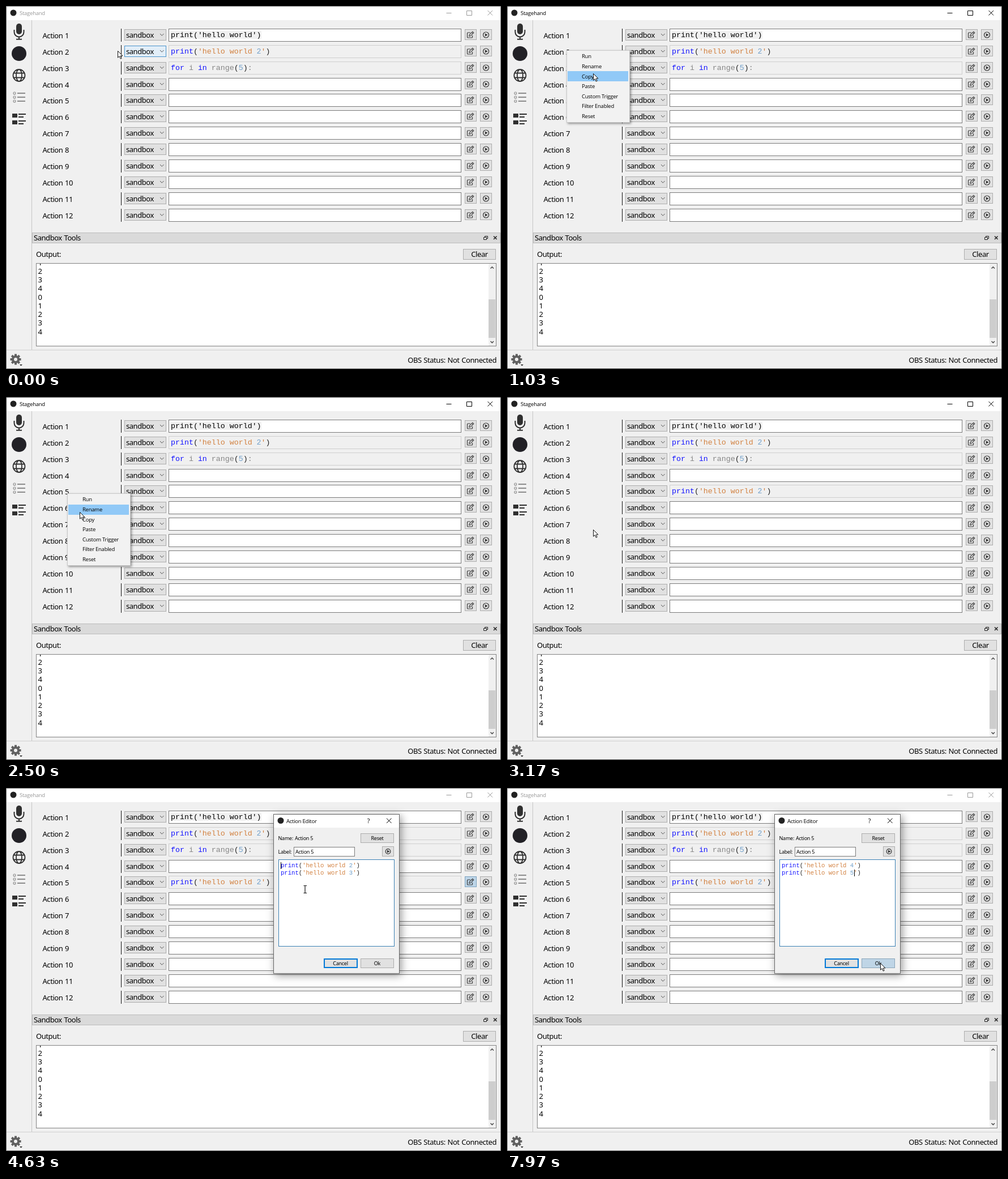
Animation of 874x641 px, one loop 8000 ms. Source, as an HTML page with a canvas:

```html
<!DOCTYPE html>
<html lang="en">
<head>
<meta charset="utf-8">
<title>Action editor demo</title>
<style>
html, body { margin: 0; width: 100%; height: 100%; overflow: hidden; background: #f0f0f0; }
canvas { display: block; }
</style>
</head>
<body>
<canvas id="stage" width="874" height="641"></canvas>
<script>
const ctx = document.getElementById('stage').getContext('2d');
const LOOP = 8000;
// Font, letter spacing, word spacing
const UI = ['13px "Noto Sans", sans-serif', '-0.45px', '0.8px'];
const SMALL = ['9px "Noto Sans", sans-serif', '-0.25px', '0px'];
const TITLE = ['9.5px "Open Sans", sans-serif', '-0.25px', '0px'];
const mono = size => [size + 'px "Liberation Mono", monospace', '0px', '0px'];
const MENU = ['Run', 'Rename', 'Copy', 'Paste', 'Custom Trigger', 'Filter Enabled', 'Reset'];

// Pointer path: time, x, y
const PATH = [
  [0, 197, 79], [30, 197, 79], [450, 105, 78], [570, 105, 78], [830, 140, 104], [870, 141, 105],
  [1030, 152, 119], [1430, 152, 119], [2080, 100, 171], [2130, 100, 171], [2200, 108, 170],
  [2270, 108, 171], [2730, 152, 234], [3370, 152, 234], [4170, 812, 163], [4230, 820, 167],
  [4330, 820, 167], [4630, 528, 179], [4690, 528, 179], [4980, 605, 151], [5030, 605, 151],
  [5230, 613, 142], [5400, 613, 142], [5570, 671, 197], [7570, 671, 197], [7930, 659, 309], [LOOP, 659, 309]
];

const clamp = v => Math.max(0, Math.min(1, v));
const ramp = (t, start, length) => clamp((t - start) / length);
const inside = (p, x, y, w, h) => p.x >= x && p.x < x + w && p.y >= y && p.y < y + h;
const rowY = i => Math.round(50.95 + 28.88 * i);

function pointer(t) {
  const i = PATH.findIndex(k => k[0] > t);
  const [t0, x0, y0] = PATH[i - 1], [t1, x1, y1] = PATH[i];
  const u = ramp(t, t0, t1 - t0), e = u * u * (3 - 2 * u);
  return { x: Math.round(x0 + (x1 - x0) * e), y: Math.round(y0 + (y1 - y0) * e) };
}

function rect(x, y, w, h, color) {
  ctx.fillStyle = color;
  ctx.fillRect(x, y, w, h);
}

function box(x, y, w, h, fill, edge, line = 1) {
  rect(x, y, w, h, edge);
  rect(x + line, y + line, w - 2 * line, h - 2 * line, fill);
}

function text(s, x, y, font, color = '#000', align = 'left') {
  [ctx.font, ctx.letterSpacing, ctx.wordSpacing] = font;
  ctx.textAlign = align;
  ctx.fillStyle = color;
  ctx.fillText(s, x, y);
}

function disc(x, y, r, color) {
  ctx.fillStyle = color;
  ctx.beginPath();
  ctx.arc(x, y, r, 0, 7);
  ctx.fill();
}

function stroke(d, color, width = 1) {
  ctx.strokeStyle = color;
  ctx.lineWidth = width;
  ctx.stroke(new Path2D(d));
}

function fill(d, color) {
  ctx.fillStyle = color;
  ctx.fill(new Path2D(d));
}

function at(x, y, draw) {
  ctx.save();
  ctx.translate(x, y);
  draw();
  ctx.restore();
}

function tokenColor(s) {
  if (/^(print|for|in)$/.test(s)) return '#1414ff';
  if (s[0] === "'") return '#d2803f';
  if (/\d/.test(s)) return '#6f9fca';
  return /[\w:]/.test(s) ? '#858585' : '#222';
}

function code(s, x, y, size) {
  for (const m of s.matchAll(/'[a-z ]*|\w+|\s+|[():]/g))
    text(m[0], x + m.index * size * 0.6, y, mono(size), tokenColor(m[0]));
}

function shadowed(blur, offset, draw) {
  ctx.save();
  ctx.shadowColor = 'rgba(0,0,0,.4)';
  ctx.shadowBlur = blur;
  ctx.shadowOffsetX = ctx.shadowOffsetY = offset;
  draw();
  ctx.restore();
}

function button(x, y, w, h, hot = 0) {
  box(x, y, w, h, '#e1e1e1', '#adadad');
  if (!hot) return;
  ctx.save();
  ctx.globalAlpha *= hot;
  box(x, y, w, h, '#e2eef8', '#4a94cc');
  ctx.restore();
}

function playIcon(x, y, r) {
  at(x, y, () => {
    ctx.beginPath();
    ctx.arc(0, 0, r, 0, 7);
    ctx.strokeStyle = '#333';
    ctx.lineWidth = 1.2;
    ctx.stroke();
    fill('M-1.7 -2.8L3 0L-1.7 2.8Z', '#333');
  });
}

function editIcon(x, y) {
  at(x, y, () => {
    stroke('M0 -4H-4.5Q-5.5 -4 -5.5 -3V4Q-5.5 5 -4.5 5H2.5Q3.5 5 3.5 4V1', '#3a3a3a', 1.2);
    stroke('M-2.3 2.3L-1.8 -.2L3.8 -5.8L5.8 -3.8L.2 1.8ZM2.3 -4.3L4.3 -2.3', '#3a3a3a', 1.1);
  });
}

function sidebar() {
  const dark = '#303030';
  at(23, 46, () => {
    ctx.fillStyle = dark;
    ctx.beginPath();
    ctx.roundRect(-5, -15, 10, 19, 5);
    ctx.fill();
    stroke('M-8.5 -4V0A8.5 8.5 0 0 0 8.5 0V-4M0 8V12M-5 12.7H5', dark, 2);
  });
  disc(23, 84, 13, '#222126');
  at(23, 122.5, () => {
    stroke('M-10.5 0A10.5 10.5 0 1 0 10.5 0A10.5 10.5 0 1 0 -10.5 0' +
      'M-5 0A5 10.5 0 1 0 5 0A5 10.5 0 1 0 -5 0M-10 -4H10M-10 4H10', dark, 1.8);
  });
  for (const dy of [-7, 0, 7]) {
    at(23, 161 + dy, () => {
      stroke('M-10 0A2 2 0 1 0 -6 0A2 2 0 1 0 -10 0', '#8c8c8c', 1.1);
      rect(-3, -1, 14, 2, '#8c8c8c');
    });
  }
  for (const y of [190, 202]) {
    rect(11, y, 9, 7, dark);
    rect(22, y, 13, 2, dark);
    rect(22, y + 5, 9, 2, dark);
  }
  at(17, 624, () => {
    for (let i = 0; i < 8; i++) {
      rect(-2, -9.5, 4, 5, '#606060');
      ctx.rotate(Math.PI / 4);
    }
    disc(0, 0, 7, '#606060');
    disc(0, 0, 3, '#f0f0f0');
  });
  fill('M24 633H29L26.5 635.6Z', '#222');
}

function windowFrame(active) {
  box(0, 0, 874, 641, '#f0f0f0', active ? '#3c3c3c' : '#6c6c6c');
  rect(1, 1, 872, 24, '#fff');
  const ink = active ? '#000' : '#999';
  disc(13, 12, 5.5, '#222');
  text('Stagehand', 24, 16, TITLE, ink);
  stroke('M777.5 12.5H786.5M813.5 8.5H822.5V16.5H813.5ZM850.5 8L859 16.5M859 8L850.5 16.5', ink);
  rect(45, 25, 1, 583, '#c6c6c6');
  rect(1, 607, 872, 1, '#d0d0d0');
}

function row(i, t) {
  const y = rowY(i);
  text('Action ' + (i + 1), 64.5, y + 6, UI);
  rect(203, y - 11, 1, 23, '#111');
  button(209, y - 10, 74, 20, i === 1 ? 1 - ramp(t, 30, 200) : 0);
  text('sandbox', 212, y + 5, UI);
  stroke(`M272 ${y - 2}L275.3 ${y + 1.3}L278.6 ${y - 2}`, '#555');

  const lines = i === 1 || (i === 4 && t >= 3170) ? ["print('hello world 2')", "print('hello world 3')"]
    : i === 2 ? ['for i in range(5):', '    print(i)'] : null;
  if (lines) {
    box(287, y - 11, 517, 23, '#f0f0f0', '#cfcfcf');
    ctx.save();
    ctx.beginPath();
    ctx.rect(288, y - 10, 515, 21);
    ctx.clip();
    lines.forEach((s, n) => code(s, 291, y + 4 + n * 16.4, 13.3));
    ctx.restore();
  } else {
    box(287, y - 11, 517, 23, '#fff', '#7a7a7a');
  }
  if (i === 0) {
    rect(290, y - 7, 161, 14, '#f0f0f0');
    text("print('hello world')", 291, y + 4, mono(13.3));
  }
  const hot = i === 4 ? ramp(t, 4180, 60) * (1 - ramp(t, 4330, 600)) : 0;
  button(810, y - 10, 21, 19, hot);
  editIcon(820, y);
  button(837, y - 10, 21, 19);
  playIcon(847.5, y, 5);
}

function tools() {
  box(46, 400, 827, 19, '#dadada', '#bcbcbc');
  text('Sandbox Tools', 49, 414, UI);
  stroke('M843.5 408.5H848.5V412.5H843.5ZM845.5 408V406.5H850.5V410.5H849', '#222');
  stroke('M861 406.5L866.5 412M866.5 406.5L861 412', '#222', 1.5);
  text('Output:', 53, 443, UI);
  button(807, 429, 58, 19);
  text('Clear', 836, 443, UI, '#000', 'center');
  box(53, 454, 813, 147, '#fff', '#828282');
  ctx.save();
  ctx.beginPath();
  ctx.rect(54, 455, 798, 145);
  ctx.clip();
  [...'123401234'].forEach((s, i) => text(s, 56.5, 457.5 + i * 15.25, UI));
  ctx.restore();
  rect(852, 455, 13, 145, '#f0f0f0');
  rect(852, 518, 12, 68, '#cdcdcd');
  stroke('M855.5 463.5L858.3 460.7L861 463.5M855.5 592L858.3 594.8L861 592', '#444', 1.4);
  text('OBS Status: Not Connected', 866, 630, UI, '#000', 'right');
}

function menu(x, y, p, alpha) {
  ctx.save();
  ctx.globalAlpha = alpha;
  shadowed(4, 2, () => rect(x, y, 112, 128, '#ccc'));
  box(x, y, 112, 128, '#f2f2f2', '#c8c8c8');
  MENU.forEach((label, i) => {
    const top = y + 2 + 17.6 * i;
    if (inside(p, x + 2, top, 108, 17.6)) rect(x + 2, Math.round(top), 107, 18, '#91c9f7');
    text(label, x + 27, top + 12.3, TITLE);
  });
  ctx.restore();
}

// Insertion point as [column, line], or null while blinked off
function caret(t) {
  if (t < 4900) return [0, 0];
  if (t < 5000 || (t >= 5500 && t < 6030) || (t >= 6570 && t < 6600) || (t >= 7570 && t < 7970)) return null;
  if (t < 6600) return [t >= 6100 && t < 6200 ? 19 : 20, 0];
  return [t >= 6900 && t < 7100 ? 19 : 20, 1];
}

function dialog(t, p) {
  ctx.save();
  ctx.globalAlpha = ramp(t, 4290, 120);
  shadowed(14, 3, () => rect(472, 46, 223, 282, '#666'));
  box(472, 46, 223, 282, '#f0f0f0', '#666');
  rect(473, 47, 221, 23, '#fff');
  disc(485, 57.5, 5.5, '#222');
  text('Action Editor', 495, 62, TITLE);
  text('?', 640, 62, ['11px "Open Sans", sans-serif', '0px', '0px'], '#000', 'center');
  stroke('M672 53.5L680.5 62M680.5 53.5L672 62', '#000');
  text('Name:', 480.5, 92, SMALL);
  text('Action 5', 510, 92, SMALL);
  text('Label:', 480.5, 116, SMALL);
  box(508, 104, 108, 17, '#fff', '#7a7a7a');
  text('Action 5', 511, 116, SMALL);
  button(664, 103, 21, 18);
  playIcon(674.5, 112, 4.3);

  const buttons = [['Reset', 627, 80], ['Cancel', 562, 301], ['Ok', 627, 301]];
  for (const [label, x, y] of buttons) {
    if (label === 'Cancel') box(x - 1, y, 60, 17, '#e1e1e1', '#0078d7', 2);
    else button(x - 1, y, 59, 17, label === 'Ok' ? ramp(t, 7900, 200) : 0);
    text(label, x + 28.5, y + 12, SMALL, '#000', 'center');
  }

  box(481, 126, 205, 154, '#fff', '#3a80b4');
  const first = t < 6100 ? '2' : t < 6200 ? '' : '4';
  const second = t < 6900 ? '3' : t < 7100 ? '' : '5';
  code(`print('hello world ${first}')`, 485, 140, 10.6);
  code(`print('hello world ${second}')`, 485, 153, 10.6);
  const c = caret(t);
  if (c) rect(Math.round(485.4 + c[0] * 6.36), 131 + c[1] * 13, 1, 12, '#000');
  ctx.restore();
}

function cursor(p, beam) {
  at(p.x, p.y, () => {
    if (beam) {
      stroke('M-2.5 -6.5H-.5L0 -6L.5 -6.5H3M0 -6V6M-2.5 6.5H-.5L0 6L.5 6.5H3', '#111', 1.2);
      return;
    }
    const arrow = 'M.5 .5V12.2L3.2 9.7L5.2 14.2L7.1 13.4L5.2 9H9Z';
    fill(arrow, '#fff');
    stroke(arrow, '#111');
  });
}

function draw(t) {
  const p = pointer(t);
  const dialogOpen = t >= 4290;
  const menu1 = t >= 560 && t < 1430, menu2 = t >= 2200 && t < 3170;
  windowFrame(t >= 530 && !dialogOpen);
  sidebar();
  for (let i = 0; i < 12; i++) row(i, t);
  tools();
  if (menu1) menu(105, 78, p, ramp(t, 530, 120));
  if (menu2) menu(108, 170, p, ramp(t, 2170, 120));
  if (dialogOpen) dialog(t, p);

  const overRow = [...Array(12).keys()].some(i => inside(p, 288, rowY(i) - 11, 516, 23));
  const overEditor = inside(p, 481, 126, 205, 154) || inside(p, 508, 104, 108, 17);
  const overDialog = dialogOpen && inside(p, 472, 46, 223, 282);
  cursor(p, overDialog ? overEditor : overRow && !dialogOpen);
}

const start = performance.now();
function tick() {
  draw((performance.now() - start) % LOOP);
  requestAnimationFrame(tick);
}
tick();
</script>
</body>
</html>
```
